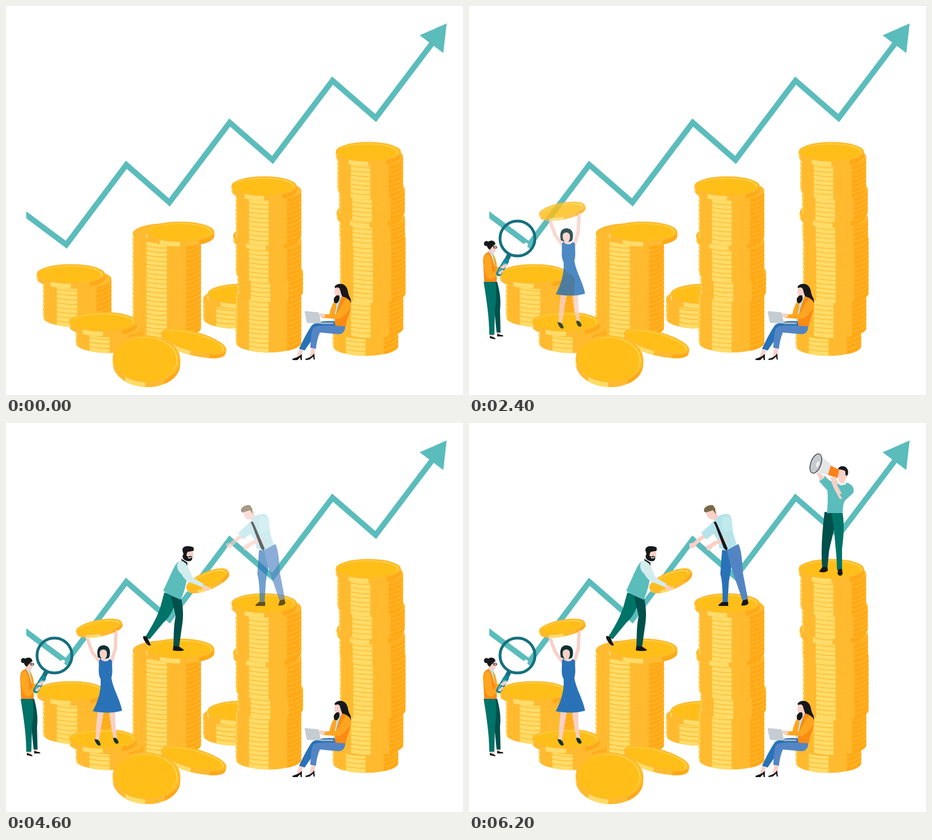
An HTML page for the animation above (6400 ms loop, 811 by 691 pixels).

```html
<!DOCTYPE html>
<html lang="en">
<head>
<meta charset="utf-8">
<title>Growth</title>
<style>
html, body { margin: 0; width: 100%; height: 100%; overflow: hidden; background: #fff; }
svg { display: block; width: 811px; height: 691px; }
.skin { fill: #f9d0c6; }
.ink { fill: #16181a; }
.teal { fill: #5bbcbc; }
.pine { fill: #007369; }
.deep { fill: #00504c; }
.blue { fill: #2a72b7; }
.denim { fill: #5385c4; }
.pale { fill: #b6e3ea; }
.amber { fill: #ffa51f; }
.orange { fill: #fa8b14; }
.limb { fill: none; stroke: #f9d0c6; stroke-linecap: round; stroke-linejoin: round; }
.in { animation: 6400ms linear infinite; }
#p1 { animation-name: a; }
#p2 { animation-name: b; }
#p3 { animation-name: c; }
#p4 { animation-name: d; }
#p5 { animation-name: e; }
/* each figure fades in over six 200 ms steps */
@keyframes a { 0% { opacity: 0 } 6.25% { opacity: 0; animation-timing-function: steps(6, start) } 25%, 100% { opacity: 1 } }
@keyframes b { 0% { opacity: 0 } 25% { opacity: 0; animation-timing-function: steps(6, start) } 43.75%, 100% { opacity: 1 } }
@keyframes c { 0% { opacity: 0 } 43.75% { opacity: 0; animation-timing-function: steps(6, start) } 62.5%, 100% { opacity: 1 } }
@keyframes d { 0% { opacity: 0 } 62.5% { opacity: 0; animation-timing-function: steps(6, start) } 81.25%, 100% { opacity: 1 } }
@keyframes e { 0% { opacity: 0 } 81.25% { opacity: 0; animation-timing-function: steps(6, start) } 100% { opacity: 1 } }
</style>
</head>
<body>
<svg viewBox="0 0 811 691">
  <clipPath id="cut"><rect x="36" width="775" height="691"/></clipPath>
  <g clip-path="url(#cut)">
    <path d="M22 360.500 107 424 213.500 282 290 349 397 207 473 273.500 579.500 132.500 656 199 758 64" fill="none" stroke="#5bbcbc" stroke-width="10"/>
    <path class="teal" d="M782 31 734 52 776 83.500Z"/>
  </g>

  <g id="stacks"></g>

  <g id="reader">
    <path class="ink" d="M583 499C586 493 597 491 603 498C608 504 606 511 610 517C614 524 613 533 606 535C599 536 598 529 594 523L590 512Z"/>
    <path class="skin" d="M584 501C587 500 590 499 592 502C594 506 594 512 598 518L589 523 588 516C583 516 582 508 584 501Z"/>
    <path class="pale" d="M587 520 597 516 592 540 586 561 580 561 582 540Z"/>
    <path class="amber" d="M586 521C579 527 575 540 573 553L581 556 586 535Z"/>
    <path class="ink" d="M587 514C582 517 581 521 582 523C581 526 584 528 587 528C592 524 593 519 591 514Z"/>
    <path class="orange" d="M596 516C606 517 612 524 612 534C611 546 604 556 603 569L582 570C584 553 588 532 596 516Z"/>
    <path class="amber" d="M604 520C611 521 614 529 612 535C607 544 597 555 590 556L561 554 562 548 586 547C592 541 596 527 604 520Z"/>
    <path class="skin" d="M566 547 558 546 554 550 560 553 566 553Z"/>
    <path class="blue" d="M583 560C568 558 548 562 543 567C535 578 527 594 520 609L530 612C538 600 548 586 555 575L585 570Z"/>
    <path class="denim" d="M602 569C602 577 598 583 590 583L557 580C553 589 551 599 550 609L540 607C541 594 541 581 545 572C551 566 574 567 602 569Z"/>
    <path class="skin" d="M520 610 527 612 523 623 515 626ZM542 608 549 609 547 620 538 626Z"/>
    <path class="ink" d="M508 627C513 625 519 624 525 618L525 629 523 629 522 624 517 629 509 629ZM531 627C537 625 542 624 547 617L548 628 546 628 545 623 539 628 532 629Z"/>
    <path fill="#aab4bc" d="M557 562 580 562 582 565 559 565Z"/>
    <path fill="#c5cdd3" d="M530 543.500Q530 542 532 542L553 544Q555 544 555.500 546L559 564 536 563Q534 563 533.500 561Z"/>
  </g>

  <g id="p1" class="in">
    <circle cx="86" cy="413" r="31" fill="none" stroke="#15707f" stroke-width="5"/>
    <circle cx="101" cy="424" r="3.500" fill="#fff"/>
    <path d="M72 441 64 456" stroke="#15707f" stroke-width="8"/>
    <path class="skin" d="M37 431 44 431 44 441 38 446 33 437Z"/>
    <path class="skin" d="M37 423C42 420 47 422 47 426L48 432 46 437 40 437 36 432Z"/>
    <circle class="ink" cx="31" cy="422" r="4.500"/>
    <path class="ink" d="M34 419C38 415 46 416 47 423C44 425 42 426 40 429L37 433C32 431 30 423 34 419Z"/>
    <path d="M40 427H49M44 427V430H49V427" fill="none" stroke="#222" stroke-width="1.200"/>
    <path class="pale" d="M35 437 42 438 47 450 48 480 42 489Z"/>
    <path class="orange" d="M35 437C26 439 24 447 25.500 461L27 491 49 490C51 472 46 449 35 437Z"/>
    <path class="amber" d="M31 441C25 445 25 457 28 472C30 481 35 487 41 486L55 474 52 468 41 474 40 456C39 446 36 440 31 441Z"/>
    <path class="pale" d="M36 437 41 438C46 446 48 455 49 464L45 462C43 453 40 444 36 437Z"/>
    <path class="amber" d="M42 440C47 446 49 455 50 464L54 463 55 468 48 473Z"/>
    <path d="M66 453 53 475" stroke="#14899a" stroke-width="10" stroke-linecap="round"/>
    <path d="M63 456 52 473" stroke="#65bdc5" stroke-width="2"/>
    <path class="skin" d="M55 464 66 457 68 461 61 467ZM51 475 59 468 62 470 56 477Z"/>
    <path class="deep" d="M39 490H50C55 508 57 524 55 540L56 580H49L44 530Z"/>
    <path class="pine" d="M26 490H47C50 511 48 525 46 541L45 584H36C36 553 31 522 26 490Z"/>
    <path class="skin" d="M37 584H44V589H38ZM50 580H55V585H51Z"/>
    <path class="ink" d="M37 586 42 588C47 589 48 592 46 592L37 590ZM50 582 55 584C61 584 62 587 60 587H50Z"/>
  </g>

  <g id="p2" class="in">
    <g id="lift"></g>
    <path class="limb" stroke-width="6" d="M145 385 153 407 168 427M195 375 194 401 186 427"/>
    <path class="limb" stroke-width="4" d="M144 384 143 381M196 376 196 370"/>
    <path d="M163 416C160 402 164 395 173 395C183 395 187 404 183 417L178 419 167 418Z" fill="#0c3236"/>
    <path class="skin" d="M167 405C171 400 179 402 179 408C180 414 177 418 176 419L182 424 176 431 168 424 171 419C167 417 165 410 167 405Z"/>
    <path class="skin" d="M163 510H174C171 528 168 545 165 564H159C160 545 160 528 163 510ZM183 510H194C193 528 195 545 197 560H191C188 545 184 528 183 510Z"/>
    <path class="blue" d="M168 418C170 424 179 426 184 419L188 422C188 434 190 441 187 453C190 472 202 490 206 511C190 516 170 515 154 512C163 495 169 477 168 455C163 446 165 438 165 422Z"/>
    <path d="M157 562C162 561 167 564 168 572C164 575 160 571 157 562ZM190 560C194 557 199 562 200 568C196 572 192 569 190 560Z" fill="#103337"/>
  </g>

  <g id="p3" class="in">
    <path class="pine" d="M281 301 306 309C300 325 292 344 279 355L255 384 247 380C258 363 270 342 275 323Z"/>
    <path class="deep" d="M292 304 311 312C315 330 315 347 312 363L307 399H297C298 378 297 363 301 343Z"/>
    <path class="ink" d="M245 378 251 381 257 395C252 398 244 386 243 380ZM297 396 307 397 316 403C315 406 301 405 296 404Z"/>
    <g id="carry"></g>
    <path class="skin" d="M319 226H331L333 235 328 243 320 243Z"/>
    <path class="ink" d="M313 226C313 218 323 217 333 221L333 227 322 229 320 235C322 237 324 239 326 236L330 237C332 243 328 247 321 245C313 243 312 236 315 233Z"/>
    <path d="M323 239Q327 241 329 238" fill="none" stroke="#fff" stroke-width="1.500"/>
    <path class="ink" d="M311 241 322 248 321 260 313 252Z"/>
    <path class="teal" d="M306 246C298 252 291 274 279 298C289 306 302 310 310 314C316 301 320 286 322 270L320 249Z"/>
    <path d="M306 246C302 252 303 261 311 268C315 275 321 282 329 284L349 292 351 286 332 275C326 264 324 254 317 248C313 244 309 244 306 246Z" fill="#d3ecee"/>
    <path class="skin" d="M348 288 356 289 362 296 356 298 348 294Z"/>
  </g>

  <g id="p4" class="in">
    <path class="limb" stroke-width="7" d="M420 199 409 207 396 219"/>
    <path class="skin" d="M391 214 402 212 402 220 396 223 391 220Z"/>
    <path class="blue" d="M449 226 467 223C468 249 464 265 461 283L459 319H450C450 299 450 283 446 268Z"/>
    <path class="denim" d="M458 225 478 215C484 226 485 248 486 266L495 313 485 315C477 288 463 256 458 225Z"/>
    <path class="ink" d="M449 318 460 318 460 325H443C442 322 446 321 449 318ZM486 315 494 313 496 320C494 324 488 325 483 324Z"/>
    <path class="skin" d="M420 157 434 150 440 160 443 168 436 177 434 171C427 173 422 167 420 157Z"/>
    <path d="M417 157C416 149 425 145 433 146L437 152 438 162 433 155 420 159Z" fill="#796947"/>
    <path class="pale" d="M435 174C439 166 450 160 460 162C468 165 467 178 467 190L475 216 456 227 444 222C444 210 438 202 434 197L421 207 412 195Z"/>
    <path d="M449 171C448 187 452 202 462 208L470 207 467 178C464 164 451 162 449 171Z" fill="#c0e9ee"/>
    <path class="limb" stroke-width="7" d="M460 205 437 213 425 221"/>
    <path class="pale" d="M453 195 468 190 469 206 457 212Z"/>
    <path class="skin" d="M419 219 430 215 432 222 424 227Z"/>
    <path class="ink" d="M434 176 438 175 441 181 459 223 457 227 452 222 437 182Z"/>
  </g>

  <g id="p5" class="in">
    <path class="deep" d="M631 158H653C651 183 643 207 639 227L636 258H627C624 229 627 190 631 158Z"/>
    <path class="pine" d="M643 158 663 159C667 185 664 205 662 224L662 261H653C653 235 649 213 648 188Z"/>
    <path class="ink" d="M627 256H636L637 262C632 267 625 265 621 264ZM655 260 662 259 663 268C661 273 655 272 654 267Z"/>
    <path class="teal" d="M621 103 632 94C638 102 645 107 655 105L670 106C679 108 684 115 682 124L667 138C663 146 664 153 663 160H635C637 145 637 129 636 120Z"/>
    <path d="M653 101 669 101 669 109 660 111 653 107Z" fill="#f5f5f5"/>
    <path class="skin" d="M617 89C621 87 627 91 631 97L623 103Z"/>
    <path class="skin" d="M656 83 670 82C673 91 671 98 667 101L666 107 659 107C655 101 654 93 656 83Z"/>
    <path class="ink" d="M655 82C657 75 669 75 672 83C674 88 672 92 671 94L668 92 668 86C664 82 660 84 655 82Z"/>
    <path d="M622 55C631 65 640 72 647 77L639 93C631 91 622 88 611 88Z" fill="#e4e6e7"/>
    <path d="M642 76 657 83 654 98 637 92Z" fill="#ff8117"/>
    <ellipse cx="615.500" cy="72" rx="9" ry="18" transform="rotate(20 615.500 72)" fill="#c8cbce" stroke="#4b4b4d" stroke-width="1.500"/>
    <ellipse cx="619" cy="73" rx="2.500" ry="5" transform="rotate(20 619 73)" fill="#f2f2f2"/>
    <path class="limb" stroke-width="8" d="M660 131 651 114 647 104"/>
    <path class="skin" d="M641 97 650 95 654 104 646 109Z"/>
    <path class="teal" d="M672 109C681 108 685 118 681 125L664 137 658 127 666 121Z"/>
  </g>
</svg>
<script>
const GOLD = '#ffba30', LIGHT = '#ffdc68', DARK = '#ffa917', FACE = '#ffbe18';

const ellipse = (x, y, rx, ry, fill) =>
  `<ellipse cx="${x}" cy="${y}" rx="${rx}" ry="${ry}" fill="${fill}"/>`;

// cylinder between two ellipse centres, with bands of light and shade
function slab(x, top, low, rx, ry) {
  const drop = u => ry * Math.sqrt(1 - u * u);
  const band = (a, b, fill) => `<path fill="${fill}" d="M${x + a * rx} ${top + drop(a)}V${low + drop(a)}
    A${rx} ${ry} 0 0 0 ${x + b * rx} ${low + drop(b)}V${top + drop(b)}Z"/>`;
  let lines = '';
  for (let y = low - 8; y > top; y -= 8)
    lines += `M${x - rx} ${y}A${rx} ${ry} 0 0 0 ${x + rx} ${y}`;
  return band(-1, 1, GOLD) + band(-1, -.96, LIGHT) + band(-.6, 0, LIGHT) + band(.56, 1, DARK) +
    `<path d="${lines}" fill="none" stroke="${GOLD}" stroke-width="1.5"/>` +
    ellipse(x, top, rx, ry, GOLD);
}

function coin(x, y, rx, ry, h, turn = 0) {
  return `<g transform="rotate(${turn} ${x} ${y})">` + slab(x, y, y + h, rx, ry) +
    ellipse(x, y, rx - 3, ry - 2, FACE) +
    ellipse(x, y, rx - 5, ry - 3, LIGHT) +
    ellipse(x - 1, y + .8, rx - 5.5, ry - 3.2, FACE) + '</g>';
}

// segments run from the ground up: [x, top, low]
const pile = (rx, ry, segs, [x, y]) =>
  segs.map(([sx, top, low]) => slab(sx, top, low, rx, ry)).join('') + coin(x, y, rx, ry, 8);

const put = (id, markup) => document.getElementById(id).innerHTML = markup;

put('stacks',
  pile(58, 18, [[408, 520, 555]], [415.5, 511.5]) +
  pile(60.5, 18, [[285.5, 404, 572]], [309, 401]) +
  pile(58, 17.5, [[466, 507, 598], [469, 472, 508], [466, 416, 474], [461, 408, 416], [466, 328, 408]], [458, 320]) +
  pile(58, 17.5, [[638, 574, 604], [647, 509, 572], [651, 412, 510], [650, 376, 412], [645, 366, 376],
    [649.5, 325, 366], [646.5, 267, 326]], [643, 259]) +
  pile(60.5, 17.5, [[126.5, 485, 553]], [115, 476]) +
  pile(60, 17.5, [[184, 571, 599]], [172, 561]) +
  coin(333, 596, 60, 17.5, 7, 15) +
  coin(249.5, 627, 60, 42, 8, 3));
put('lift', coin(165, 362, 41.5, 12.5, 5, -11));
put('carry', coin(357, 278, 40, 13.5, 5, -23));
</script>
</body>
</html>
```
